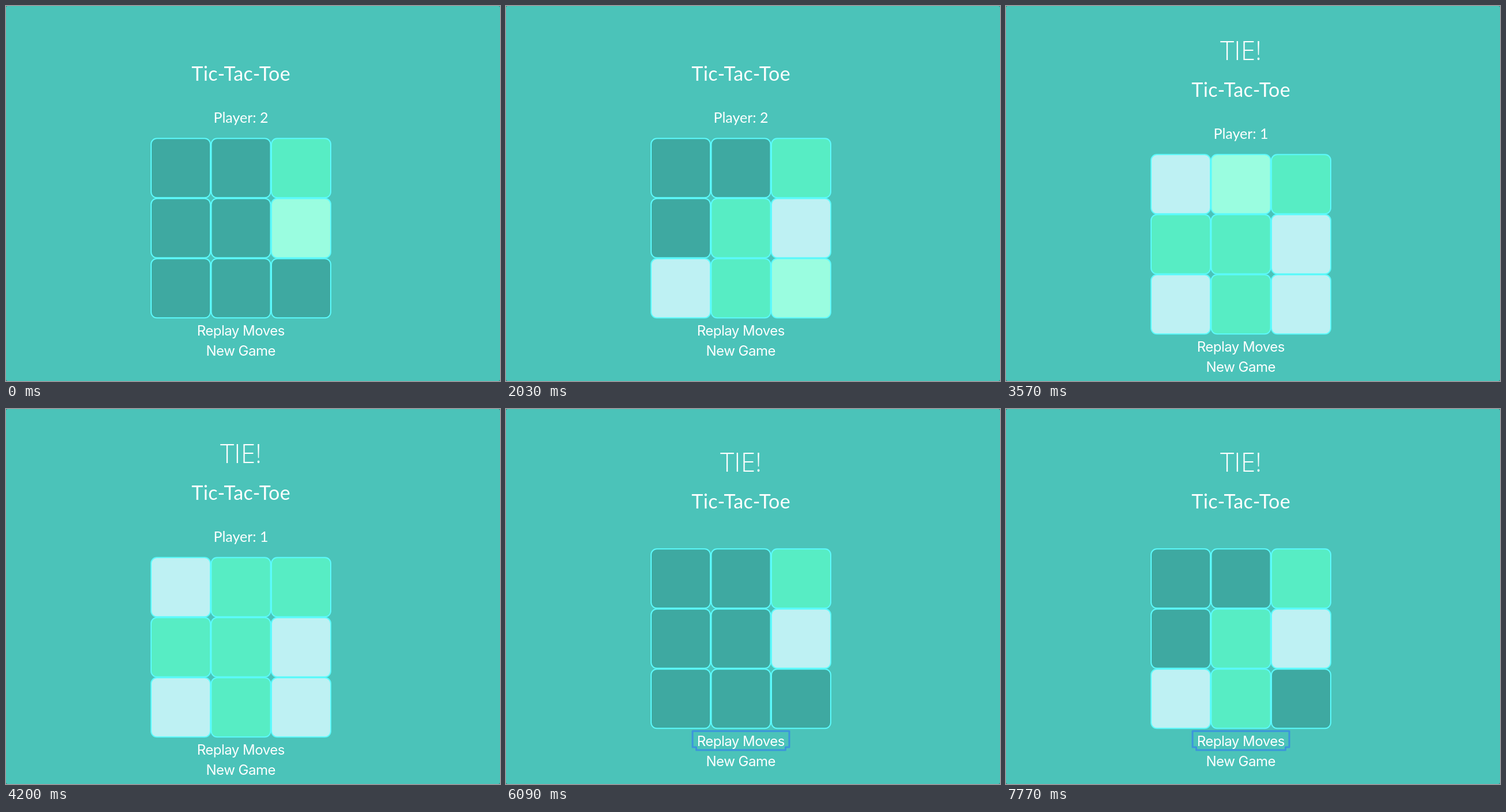
These frames come from a looping animation (858 px wide and 652 px high, 8 s). An HTML page with a canvas:

```html
<!DOCTYPE html>
<html lang="en">
<head>
<meta charset="utf-8">
<title>Tic-Tac-Toe</title>
<style>
html, body { margin: 0; width: 100%; height: 100%; overflow: hidden; background: #4bc3b9; }
canvas { display: block; }
</style>
</head>
<body>
<canvas id="stage" width="858" height="652"></canvas>
<script>
const ctx = document.getElementById("stage").getContext("2d");
const W = 858, H = 652, LOOP = 8000, MID = 408, PITCH = 104.5, SIZE = 103;
const COLORS = { bg: "#4bc3b9", corner: "#2b716c", empty: "#3ea9a1", p1: "#57edc4", p2: "#bef1f3",
  hover: "#9afde0", line: "#5cfafc", focus: "#3c94dc" };

// Each click of the game; the last one lands on the replay button below the middle column
const clicks = [
  { cell: 2, at: -500 }, { cell: 5, at: 350 }, { cell: 4, at: 910 }, { cell: 6, at: 1400 }, { cell: 7, at: 1680 },
  { cell: 8, at: 2100 }, { cell: 3, at: 2380 }, { cell: 0, at: 2660 }, { cell: 1, at: 3320 }, { cell: 10, at: 4500 }
];
const TIE = clicks[8].at, REPLAY = clicks[9].at, PRESS = REPLAY - 160, STEP = 800;

const clamp = (v, lo, hi) => Math.min(hi, Math.max(lo, v));
const col = cell => cell % 3;
const row = cell => Math.floor(cell / 3);

// The pointer rests on a cell, then glides straight to the next one between two clicks
function hoveredCell(t) {
  const next = clicks.findIndex(c => c.at > t);
  if (next < 0) return -1;
  const a = clicks[next - 1], b = clicks[next];
  const k = clamp(((t - a.at) / (b.at - a.at) - 0.38) / 0.29, 0, 1);
  const mix = axis => Math.round(axis(a.cell) + (axis(b.cell) - axis(a.cell)) * k);
  return mix(row) * 3 + mix(col);
}

function label(text, y, font, spacing = 0) {
  ctx.font = font;
  ctx.letterSpacing = spacing + "px";
  ctx.fillText(text, MID + spacing / 2, y);
}

function drawBoard(top, count, hover) {
  ctx.lineWidth = 2;
  ctx.strokeStyle = COLORS.line;
  for (let i = 0; i < 9; i++) {
    const turn = clicks.findIndex(c => c.cell === i);
    const owner = turn < count ? (turn % 2 ? "p2" : "p1") : "empty";
    ctx.beginPath();
    ctx.roundRect(MID - SIZE / 2 + PITCH * (col(i) - 1), top + PITCH * row(i), SIZE, SIZE, 10);
    ctx.fillStyle = COLORS[i === hover ? "hover" : owner];
    ctx.fill();
    ctx.stroke();
  }
}

// Outline around the button: a wide box joined to a narrower, lower one
function drawFocus(y) {
  const wide = 84, narrow = 77.5;
  ctx.beginPath();
  ctx.moveTo(MID - wide, y);
  ctx.lineTo(MID + wide, y);
  ctx.lineTo(MID + wide, y + 28);
  ctx.lineTo(MID + narrow, y + 28);
  ctx.lineTo(MID + narrow, y + 33);
  ctx.lineTo(MID - narrow, y + 33);
  ctx.lineTo(MID - narrow, y + 28);
  ctx.lineTo(MID - wide, y + 28);
  ctx.closePath();
  ctx.lineWidth = 3;
  ctx.lineJoin = "round";
  ctx.strokeStyle = COLORS.focus;
  ctx.stroke();
}

function drawBackground() {
  ctx.fillStyle = COLORS.corner;
  ctx.fillRect(0, 0, W, H);
  ctx.fillStyle = COLORS.bg;
  ctx.beginPath();
  ctx.roundRect(0, 0, W, H, 3);
  ctx.fill();
}

function draw(t) {
  const tie = t >= TIE, replay = t >= REPLAY;
  const played = clicks.filter(c => c.at <= t).length;
  const count = replay ? 1 + Math.floor((t - REPLAY) / STEP) : played;
  const head = replay ? 43 : tie ? 28 : 0;
  const body = replay ? 13 : head;

  drawBackground();
  drawBoard(230.3 + body, count, hoveredCell(t));
  if (t >= PRESS) drawFocus(547 + body);

  ctx.fillStyle = "#fff";
  ctx.textAlign = "center";
  if (tie) label("TIE!", 66 + head, "300 46px 'Open Sans', sans-serif");
  label("Tic-Tac-Toe", 130 + head, "400 34px Lato, sans-serif", 0.4);
  if (!replay) label("Player: " + (Math.min(played, 8) % 2 + 1), 203 + head, "400 25px Lato, sans-serif");
  label("Replay Moves", 573 + body, "400 24px Inter, sans-serif", -0.5);
  label("New Game", 608 + body, "400 24px Inter, sans-serif", -0.5);
}

function frame() {
  draw(performance.now() % LOOP);
  requestAnimationFrame(frame);
}
frame();
</script>
</body>
</html>
```
